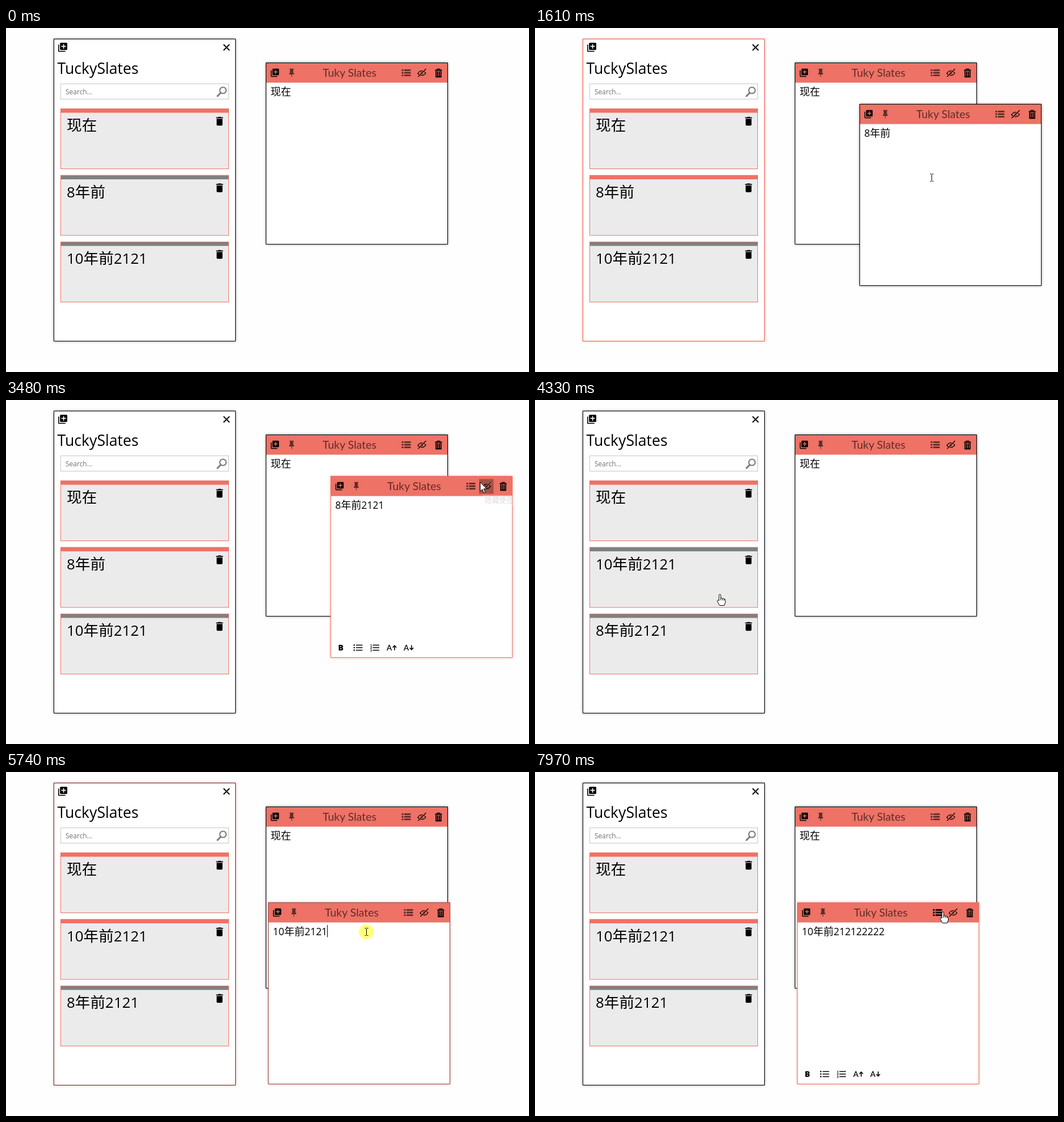
An HTML page that plays this animation: 922 px wide and 607 px high, repeating every 8 s.

```html
<!DOCTYPE html>
<html lang="zh">
<head>
<meta charset="utf-8">
<title>Notes</title>
<style>
html, body { margin: 0; width: 100%; height: 100%; overflow: hidden; background: #fefefe; }
#stage { display: block; width: 922px; height: 607px; }
text { font-family: "Open Sans", "Noto Sans CJK SC", "Noto Sans CJK", sans-serif; white-space: pre; }
.cjk { font-family: "Noto Sans CJK SC", "Noto Sans CJK", sans-serif; }
.num { font-family: "Open Sans", sans-serif; font-size: .97em; }
.title { font: 19.5px Lato, sans-serif; text-anchor: middle; opacity: .6; }
.line { fill: none; stroke: #000; }
</style>
</head>
<body>
<svg id="stage" viewBox="0 0 922 607"></svg>
<script>
const LOOP = 8000, TICK = 77.68, LEAD = 31.5;
const RED = '#ee7266', GRAY = '#808080';
const stage = document.getElementById('stage');

// Icons on a 24 unit grid
const ICON = {
  add: 'M4 6H2v14c0 1.1.9 2 2 2h14v-2H4V6zm16-4H8c-1.1 0-2 .9-2 2v12c0 1.1.9 2 2 2h12c1.1 0 2-.9 2-2V4c0-1.1-.9-2-2-2zm-1 9h-4v4h-2v-4H9V9h4V5h2v4h4v2z',
  bin: 'M6 19c0 1.1.9 2 2 2h8c1.1 0 2-.9 2-2V7H6v12zM19 4h-3.5l-1-1h-5l-1 1H5v2h14V4z',
  pin: 'M16 12V4h1V2H7v2h1v8l-2 2v2h5.2v6h1.6v-6H18v-2l-2-2z'
};
const icon = (name, x, y, scale, extra = '') =>
  `<path d="${ICON[name]}" transform="translate(${x} ${y}) scale(${scale}) translate(-12 -12)" ${extra}/>`;
const at = (x, y, body, extra = '') => `<g transform="translate(${x} ${y})" ${extra}>${body}</g>`;
const line = (d, width = 1.5, extra = '') => `<path class="line" d="${d}" stroke-width="${width}" ${extra}/>`;
const rich = s => s.replace(/\d+/g, m => `<tspan class="num">${m}</tspan>`);

const slits = line('M-4.3 -4V6.8H4.3V-4M-1.5 -3V6M1.5 -3V6', 1.9) + line('M-6 -5H6', 2) + line('M-2.3 -6V-7H2.3V-6', 1.6);
const rows = [-4.7, 0, 4.7].map(y => `<path d="M-8 ${y - 1.4}h3.2v2.8h-3.2zM-3.4 ${y - 1.4}H8v2.8H-3.4z"/>`).join('');
const eye = line('M-7 1Q-4 -3.4 0 -3.4T7 .6Q4 4.6 0 4.6T-7 1Z', 1.3) + '<circle r="2.2" cy=".6"/>' +
  line('M-6.5 7L7.5 -7', 3, `style="stroke:${RED}"`) + line('M-6.5 7L7.5 -7', 1.3);

function listIcon(numbered) {
  return [-4.5, 0, 4.5].map((y, i) => line(`M-3.5 ${y}H8`, 1.6) + (numbered
    ? `<text x="-8" y="${y + 2}" font-size="5.5" font-weight="700">${i + 1}</text>`
    : `<circle cx="-6.6" cy="${y}" r="1.3"/>`)).join('');
}
const sizeIcon = arrow =>
  `<text x="-9" y="5" font-size="13.5" font-weight="600" style="font-family:Lato,sans-serif">A</text>` + line(arrow, 1.6);

const toolbar =
  '<text x="13" y="307" font-size="14" font-weight="800">B</text>' +
  at(48, 302.5, listIcon(false)) + at(77.5, 302.5, listIcon(true)) +
  at(107.5, 302, sizeIcon('M5 5V-3M1.8 .2L5 -3L8.2 .2')) +
  at(137.5, 302, sizeIcon('M5 -4V4M1.8 .8L5 4L8.2 .8'));

const frame = (w, h) => `<rect class="back" width="${w}" height="${h}" fill="#fff"/>`;
const border = (w, h) => `<rect class="edge line" width="${w}" height="${h}"/>`;

function addGroup(html) {
  const g = document.createElementNS('http://www.w3.org/2000/svg', 'g');
  g.innerHTML = html;
  stage.append(g);
  return g;
}

function makeNote(x, y) {
  const g = addGroup(frame(320, 320) +
    `<svg width="320" height="320" overflow="hidden"><g class="content">
      <rect width="320" height="35" fill="${RED}"/>
      <rect class="hover" x="261.5" y="5" width="25.5" height="26" opacity="0"/>
      ${icon('add', 15.5, 17.5, .72)}${icon('pin', 45, 17.5, .72, 'opacity=".6"')}
      <text class="title" x="147" y="24.5">Tuky Slates</text>
      ${at(247, 17.5, rows, 'class="rows" opacity=".6"')}
      ${at(274.5, 17.5, eye)}${at(304, 18, slits)}
      <text class="words cjk" x="8" y="57.5" font-size="18"></text>
      <path class="caret line" d="M0 39.5V61"/>
    </g><g class="tools">${toolbar}</g></svg>` + border(320, 320));
  const find = c => g.querySelector('.' + c);
  return { g, x, y, find, words: find('words'), caret: find('caret') };
}

const panel = addGroup(frame(320, 533) +
  icon('add', 15.5, 14.5, .8) + line('M299 9.5L309.5 20M309.5 9.5L299 20', 1.8) +
  '<text x="6" y="61.5" font-size="26.67">TuckySlates</text>' +
  '<rect x="12" y="79" width="296" height="27" fill="#fff" stroke="#c6c6c6"/>' +
  '<text x="20.5" y="97.5" font-size="12" fill="#707070">Search...</text>' +
  '<g fill="none" stroke="#777"><circle cx="298" cy="90.5" r="5.6" stroke-width="2"/><path d="M294 95L287.5 101.5" stroke-width="2.8"/></g>' +
  '<g class="cards">' + [0, 1, 2].map(i => at(12, 123 + i * 117.5,
    `<rect width="296" height="106" fill="#ebebeb"/><rect class="bar" width="296" height="7" fill="${i ? GRAY : RED}"/>
     <rect width="296" height="106" fill="none" stroke="${RED}"/>
     <text class="label cjk" x="10.5" y="38.7" font-size="26.67"></text>` + icon('bin', 280, 22, .86))).join('') +
  '</g>' + border(320, 533));
panel.setAttribute('transform', 'translate(84.5 19.5)');
const cards = panel.querySelector('.cards');
const labels = panel.querySelectorAll('.label');
const bar = panel.querySelectorAll('.bar')[1];

const now = makeNote(458.5, 61.5), eight = makeNote(572.5, 134.5), ten = makeNote(462.5, 230.5);
const tip = addGroup('<rect x="841" y="168" width="55" height="18" fill="#fff"/><text class="cjk" x="844" y="181" font-size="12.7" fill="#777">隐藏便签</text>');
const glow = addGroup('<circle r="13" fill="#ffff50" opacity=".76"/>');
const POINTERS = {
  arrow: '<path d="M0 0V16L3.7 12.6L6.3 18.7L8.8 17.6L6.2 11.7H11.3Z" fill="#fff" stroke="#000"/>',
  hand: '<path d="M-1.6 11V1.6Q-1.6 0 0 0T1.6 1.6V7Q3.5 5.8 4.6 7.4Q6.4 6.6 7.4 8.2Q9.6 7.8 9.6 10.3V14L7.8 19.5H-.6L-4.4 12.8Q-5.4 10.4 -3.3 10Z" fill="#fff" stroke="#000"/><path class="line" d="M1.6 7V10.5M4.6 7.4V10.5M7.4 8.2V11"/>',
  beam: '<path class="line" d="M-2.5 -6.5H-.5L.5 -5.5L1.5 -6.5H3.5M.5 -5.5V5.5M-2.5 6.5H-.5L.5 5.5L1.5 6.5H3.5"/>'
};
const pointer = addGroup('');

// Keys are [tick, x, y, shape]
const PATH = [
  [1, 650, 550, 'arrow'], [3, 450, 400, 'arrow'], [4, 350, 350, 'hand'], [5, 290, 325, 'hand'], [6, 267, 316, 'hand'],
  [13, 267, 316, 'hand'], [15, 337, 321, 'hand'], [16, 420, 318, 'arrow'], [18, 640, 281, 'beam'], [20, 697, 265, 'beam'],
  [21, 699, 264, 'beam'], [29, 699, 264, 'beam'], [31, 715, 215, 'beam'], [33, 740, 160, 'arrow'], [35, 805, 128, 'arrow'],
  [37, 834, 142, 'arrow'], [38, 834, 142, 'arrow'], [39, 836, 145, 'arrow'], [49, 836, 145, 'arrow'], [52, 640, 270, 'arrow'],
  [54, 450, 345, 'arrow'], [55, 360, 350, 'hand'], [57, 292, 336, 'hand'], [67, 292, 336, 'hand'], [70, 410, 325, 'arrow'],
  [72, 570, 296, 'beam'], [74, 635, 282, 'beam'], [90, 635, 282, 'beam'], [91, 636, 282, 'beam'], [95, 636, 282, 'beam'],
  [98, 665, 271, 'beam'], [100, 695, 258, 'arrow'], [101, 707, 250, 'hand'], [103, 719, 247, 'hand']
];
const CLICKS = [[8, 9], [23, 24], [46, 46], [60, 61], [74, 75]];
const PANEL_FOCUS = [[13, 0], [15, 1], [23, 1], [25, 0], [65, 0], [67, 1], [73, 1], [75, 0]];
const TIP = [[43, 0], [45, .25], [46, .5], [47, 0]];
// Offsets in ticks from the moment a note opens
const OPEN = [[0, .05, .958], [1, .5, .98], [2, .94, .997], [3, 1, 1]];
const SLIDE = [[0, 60, 0], [1, 30, .2], [2, 9, .55], [3, 5, .75], [4, 2, .88], [6, 0, 1]];

// Linear values of the numeric columns at tick k
function mix(keys, k) {
  let i = keys.findIndex(key => key[0] > k);
  if (i === 0) return keys[0].slice(1);
  if (i < 0) return keys[keys.length - 1].slice(1);
  const a = keys[i - 1], b = keys[i], f = (k - a[0]) / (b[0] - a[0]);
  return a.slice(1).map((v, j) => typeof v === 'number' ? v + (b[j + 1] - v) * f : v);
}
const within = (k, a, b) => k >= a && k <= b;
const show = (el, value) => el.setAttribute('opacity', Number(value));
const shade = (rgb, f) => rgb.map(v => Math.round(v * f));

function setHtml(el, html) {
  if (el.shown === html) return;
  el.shown = html;
  el.innerHTML = html;
}

function focus(g, f, hue) {
  g.querySelector('.back').style.filter = `drop-shadow(0 0 2px rgba(${shade([240, 95, 80], f)},.62))`;
  g.querySelector('.edge').style.stroke = `rgb(${shade(hue, f)})`;
}

function drawNote(note, k, { opened, closing = 999, focused, text, keys = [], tools, caret }) {
  let [alpha, scale] = mix(OPEN, k - opened);
  if (k >= closing) { alpha = .35; scale = .97; }
  if (k < opened || k > closing) alpha = 0;
  show(note.g, alpha);
  if (!alpha) return;
  note.g.setAttribute('transform',
    `translate(${note.x + 160} ${note.y + 160}) scale(${scale}) translate(-160 -160)`);
  const [dx, ink] = mix(SLIDE, k - opened), content = note.find('content');
  content.setAttribute('transform', `translate(${dx} ${dx ? .5 : 0})`);
  show(content, ink);
  focus(note.g, focused ? mix([[focused, 0], [focused + 3, 1]], k)[0] : 0, [238, 114, 102]);
  const typed = keys.filter(([tick]) => tick <= k).map(key => key[1]).join('');
  setHtml(note.words, rich(text + typed));
  const [rise, fade] = mix([[tools - 1, 12, 0], [tools, 9, .3], [tools + 1, 4, .7], [tools + 2, 0, 1]], k);
  note.find('tools').setAttribute('transform', `translate(0 ${rise})`);
  show(note.find('tools'), fade);
  const on = caret && within(k, ...caret);
  show(note.caret, on);
  if (on) note.caret.setAttribute('transform', `translate(${Math.round(8 + note.words.getComputedTextLength())} 0)`);
}

function draw(t) {
  const k = Math.floor((t + LEAD) / TICK);
  focus(panel, mix(PANEL_FOCUS, k)[0], [239, 90, 76]);
  const moved = k >= 47;
  const names = moved ? ['现在', '10年前2121', '8年前2121'] : ['现在', '8年前', '10年前2121'];
  labels.forEach((el, i) => setHtml(el, rich(names[i])));
  show(cards, !(within(k, 13, 14) || within(k, 65, 66)));
  const lit = mix(moved ? [[59, 0], [63, 1]] : [[7, 0], [11, 1]], k)[0];
  bar.setAttribute('fill', `rgb(${[110, -14, -26].map(d => Math.round(128 + d * lit))})`);

  drawNote(now, k, { opened: -20, text: '现在', tools: 999 });
  drawNote(eight, k, {
    opened: 13, closing: 47, focused: 22, text: '8年前', tools: 26, caret: [24, 40],
    keys: [[29, '2'], [32, '1'], [34, '2'], [36, '1']]
  });
  drawNote(ten, k, {
    opened: 65, focused: 72, text: '10年前2121', tools: 76, caret: [74, 98],
    keys: [80, 84, 87, 90, 93].map(tick => [tick, '2'])
  });
  show(eight.find('hover'), within(k, 37, 47) ? .3 : 0);
  show(ten.find('rows'), k >= 101 ? 1 : .6);
  show(tip, mix(TIP, k)[0]);

  const [x, y, shape] = mix(PATH, k);
  const place = `translate(${Math.round(x)} ${Math.round(y)})`;
  pointer.setAttribute('transform', place);
  glow.setAttribute('transform', place);
  setHtml(pointer, POINTERS[shape]);
  show(pointer, k > 0);
  show(glow, CLICKS.some(c => within(k, ...c)));
}

const start = performance.now();
function run() {
  draw((performance.now() - start) % LOOP);
  requestAnimationFrame(run);
}
run();
</script>
</body>
</html>
```
